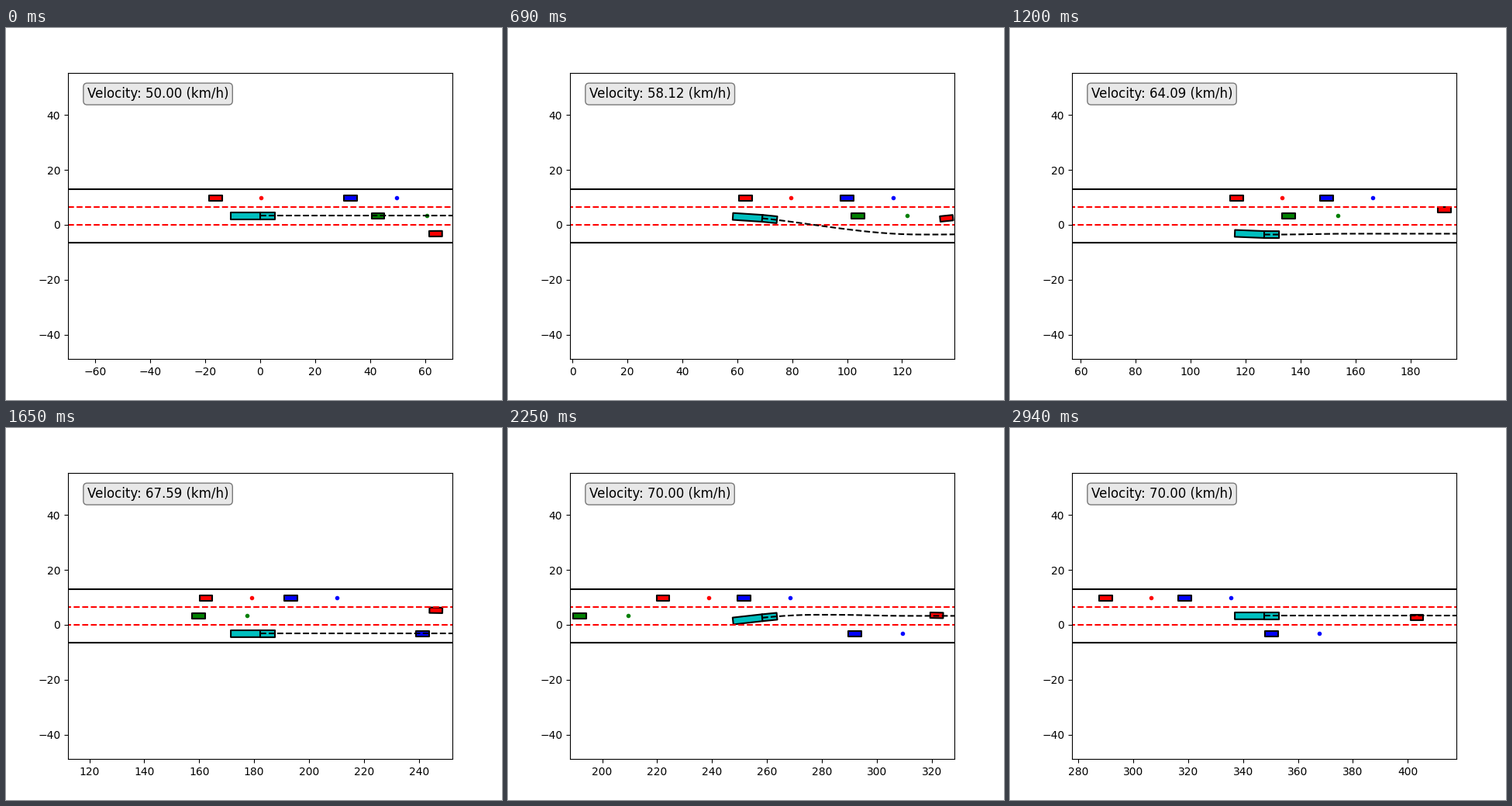
Write a matplotlib script that moves like this. It is 640 by 480 pixels and loops after 2970 ms.

```python
import numpy as np
import matplotlib.pyplot as plt
from matplotlib.animation import FuncAnimation
from matplotlib.patches import Polygon

FRAMES, INTERVAL = 99, 30
DT = 0.2             # simulated seconds per frame
VIEW = 70            # half of the visible road length
LANE = 6.5
PLAN_STEPS = 26      # how far the planned path looks ahead
CAR = (-2.35, 2.35, 2.0)       # back, front, width
TRACTOR = (0.0, 5.4, 2.5)
TRAILER = (-10.7, 0.2, 2.5)
FIRST_CHANGE, SECOND_CHANGE = 18, 60

steps = np.arange(FRAMES + PLAN_STEPS)


def ease(t, start, span):
    u = np.clip((t - start) / span, 0, 1)
    return u * u * (3 - 2 * u)


def travel(start, kmh):
    """Positions reached from start at the given speed per step."""
    v = np.broadcast_to(kmh, steps.shape) / 3.6
    return start + DT * np.append(0, np.cumsum((v[1:] + v[:-1]) / 2))


def change_lane(t, start, span, overshoot):
    """Sideways move of one lane that swings wide and settles back."""
    return ((LANE + overshoot) * ease(t, start, span)
            - overshoot * ease(t, start + span + 1.5, 7))


def truck_y(t):
    return (LANE / 2 - change_lane(t, FIRST_CHANGE, 22, 0.3)
            + change_lane(t, SECOND_CHANGE, 20, 0.4))


def heading(x, y):
    return np.arctan2(np.gradient(y), np.gradient(x))


def box(x, y, angle, dims):
    back, front, width = dims
    w = width / 2
    pts = np.array([(back, -w), (front, -w), (front, w), (back, w)])
    c, s = np.cos(angle), np.sin(angle)
    return pts @ np.array([(c, s), (-s, c)]) + (x, y)


# Truck: speeds up, eases off behind a slow car, speeds up again
speed = np.interp(steps, [0, 23, 51.8, SECOND_CHANGE, 69.81],
                  [50, 58.12, 68.235, 66.582, 70])
ego_x, ego_y = travel(0, speed), truck_y(steps)
yaw = heading(ego_x, ego_y)
trailer_yaw = np.zeros(len(steps))
for k in steps[1:]:
    lag = yaw[k] - trailer_yaw[k - 1]
    ds = ego_x[k] - ego_x[k - 1]
    trailer_yaw[k] = trailer_yaw[k - 1] + ds / -TRAILER[0] * np.sin(lag)

# Traffic: each row is colour, x, y, distance to the look-ahead point
right, middle, left = (np.full(len(steps), n * LANE) for n in (-0.5, 0.5, 1.5))
leader = travel(32.9, 52.5)
follower = leader - 28.3 - 20.8 * np.exp(-steps / 26.3)
braking = travel(42.9, np.interp(steps, [12, 37], [50, 28.8]))
merging = travel(63.9, np.interp(steps, [0, 36, 54, 78, 98],
                                 [55, 60, 67.2, 69, 57]))
merging_y = -LANE / 2 + 8.85 * ease(steps, 0, 39) - 2.95 * ease(steps, 46, 44)
TRAFFIC = [
    ("r", follower, left, 16.6),
    ("b", leader, left, 16.8),
    ("g", braking, middle, 17.8),
    ("r", merging, merging_y, 17.5),
    ("b", travel(101.65, 45.7), right, 17.2),
]

fig, ax = plt.subplots(figsize=(6.4, 4.8), dpi=100)
half_height = VIEW * 369.6 / 496
ax.set_ylim(LANE / 2 - half_height, LANE / 2 + half_height)

for y, style in ((-LANE, "k-"), (0, "r--"), (LANE, "r--"), (2 * LANE, "k-")):
    ax.plot([-VIEW, 500], [y, y], style)


def add_box(color):
    return ax.add_patch(Polygon(np.zeros((4, 2)), fc=color, ec="k", lw=1.5,
                                joinstyle="round"))


trailer, tractor = add_box("c"), add_box("c")
cars = [(add_box(c), ax.plot([], [], c + ".")[0], x, y, heading(x, y), ahead)
        for c, x, y, ahead in TRAFFIC]
plan, = ax.plot([], [], "k--")
label = ax.text(0.05, 0.95, "", transform=ax.transAxes, fontsize=12, va="top",
                bbox=dict(boxstyle="round", facecolor="lightgray", alpha=0.5))


def update(i):
    x0, y0 = ego_x[i], ego_y[i]
    ax.set_xlim(x0 - VIEW, x0 + VIEW)
    label.set_text(f"Velocity: {speed[i]:.2f} (km/h)")

    trailer.set_xy(box(x0, y0, trailer_yaw[i], TRAILER))
    tractor.set_xy(box(x0, y0, yaw[i], TRACTOR))

    # The plan only knows the manoeuvre under way
    known = next(p for p in (FIRST_CHANGE, SECOND_CHANGE, np.inf) if i <= p)
    future = slice(i, i + PLAN_STEPS)
    plan.set_data(ego_x[future], truck_y(np.minimum(steps[future], known)))

    for body, dot, x, y, angle, ahead in cars:
        body.set_xy(box(x[i], y[i], angle[i], CAR))
        dot.set_data([x[i] + ahead], [y[i]])
        for part in (body, dot):
            part.set_visible(x[i] - x0 > -VIEW)
    return []


anim = FuncAnimation(fig, update, frames=FRAMES, interval=INTERVAL,
                     repeat=True, repeat_delay=0, blit=False)
plt.show()
```
